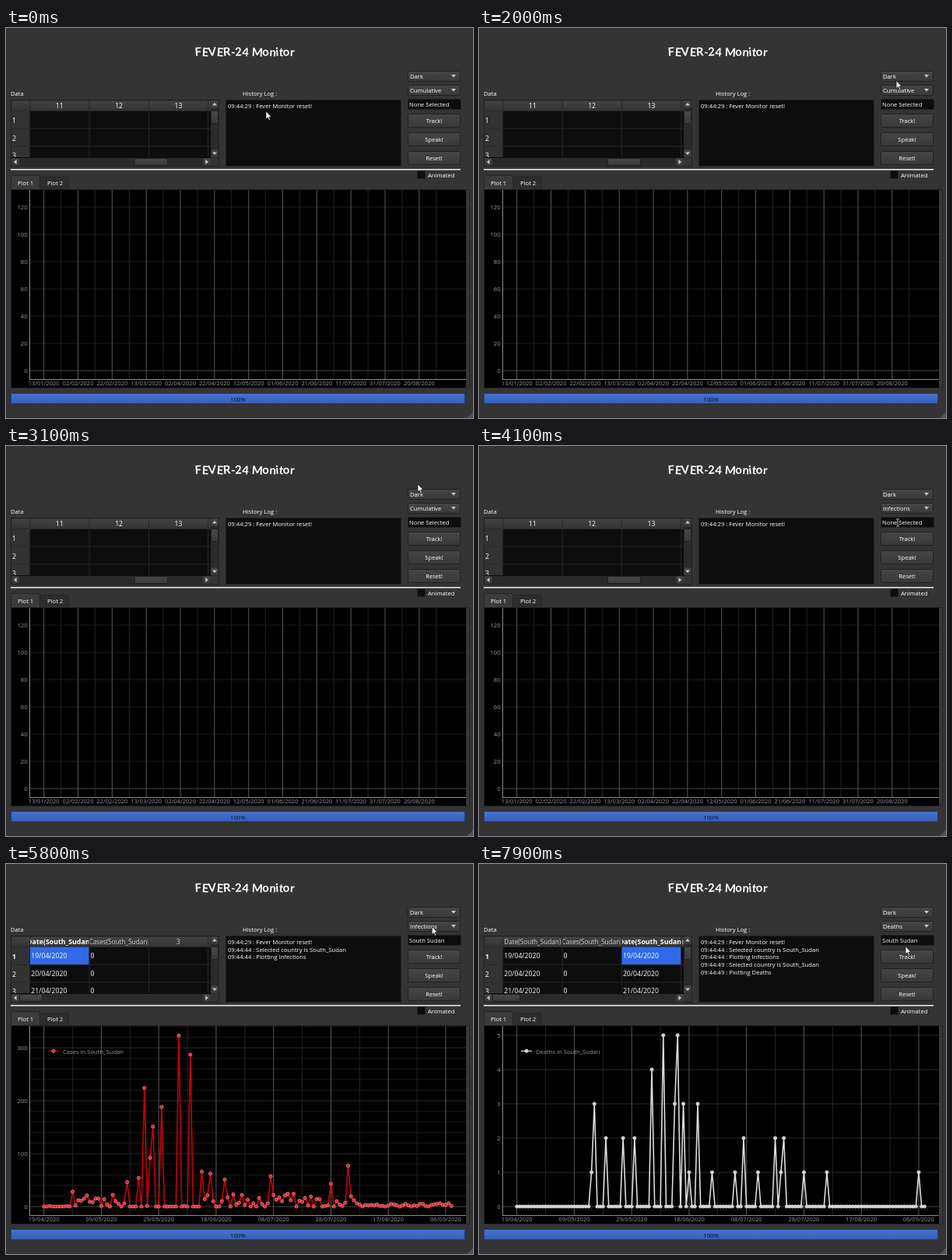
Recreate the animation shown at these times as an HTML page with a canvas. Size 600x501 px, loop 8000 ms.

```html
<!DOCTYPE html>
<html lang="en">
<head>
<meta charset="utf-8">
<title>Fever Monitor</title>
<style>
html, body { margin: 0; width: 100%; height: 100%; overflow: hidden; background: #353435; }
canvas { display: block; }
</style>
</head>
<body>
<canvas id="stage"></canvas>
<script>
const W = 600, H = 501, LOOP = 8000;
const canvas = document.getElementById('stage');
const c = canvas.getContext('2d');
const dpr = window.devicePixelRatio || 1;
canvas.width = W * dpr;
canvas.height = H * dpr;
canvas.style.width = W + 'px';
canvas.style.height = H + 'px';

const DARK = {
  bg: '#353435', ink: '#fff', field: '#0e0d0e', line: '#222', cellLine: '#292829',
  headTop: '#444344', headEnd: '#343334', btnTop: '#474647', btnEnd: '#3a393a', btnLine: '#222122',
  track: '#2b2a2b', thumb: '#4a494a', arrow: '#c8c8c8', rule: '#e4e4e4',
  tabOn: '#3c3b3c', tabOff: '#2e2d2e', frame: '#252425', gutter: '#393839',
  barTop: '#4774d1', barEnd: '#355db8', barLine: '#203b77'
};
const LIGHT = {
  bg: '#fdfdfd', ink: '#000', field: '#fff', line: '#c0c0c0', cellLine: '#d4d4d4',
  headTop: '#fbfbfb', headEnd: '#ececec', btnTop: '#fdfdfd', btnEnd: '#efefef', btnLine: '#bcbcbc',
  track: '#e6e6e6', thumb: '#f8f8f8', arrow: '#555', rule: '#a0a0a0',
  tabOn: '#fcfcfc', tabOff: '#e6e6e6', frame: '#c4c4c4', gutter: '#fdfdfd',
  barTop: '#78a2fa', barEnd: '#5a87ec', barLine: '#4068b8'
};

// daily counts: the tall spikes by day, the rest by rule
const DAYS = 143;
const CASE_SPIKES = {
  10: 28, 29: 46, 33: 54, 35: 224, 37: 92, 38: 151, 41: 188, 47: 323,
  51: 287, 55: 66, 58: 62, 63: 51, 79: 57, 100: 43, 106: 77
};
const DEATH_SPIKES = {
  26: 1, 27: 3, 31: 2, 37: 2, 41: 2, 47: 4, 51: 5, 55: 3, 56: 5, 58: 3,
  63: 3, 79: 2, 90: 2, 93: 2, 140: 1
};
const noise = i => Math.abs(Math.sin(i * 127.1) * 43758.5) % 1;
function backgroundCases(i) {
  const quiet = i < 10 || (i > 29 && i < 55);
  const height = quiet ? 1 : i < 110 ? 30 : 8;
  return Math.round(Math.max(0, noise(i) - .2) * height);
}
const series = (spikes, rest) => Array.from({ length: DAYS }, (_, i) => spikes[i] ?? rest(i));
const cases = series(CASE_SPIKES, backgroundCases);
const deaths = series(DEATH_SPIKES, i => i >= 60 && i < 110 && i % 8 === 4 ? 1 : 0);

// a tick every 20 days
const ticks = (month, day, count) => Array.from({ length: count }, (_, k) =>
  new Date(2020, month - 1, day + 20 * k).toLocaleDateString('en-GB'));
const early = ticks(1, 13, 12), late = ticks(4, 19, 8);
const PLOTS = [
  { dates: early, dx: 43.83, unit: 35, step: 20, max: 120, minor: 0 },
  { dates: late, dx: 73.75, unit: 68, step: 100, max: 300, minor: 5,
    data: cases, name: 'Cases', line: '#c60008', fill: '#e22030', edge: '#ff9a9e' },
  { dates: late, dx: 73.75, unit: 44, step: 1, max: 5, minor: 0,
    data: deaths, name: 'Deaths', line: '#dcdcdc', fill: '#d0d0d0', edge: '#eee' }
];

// time, x, y of the pointer
const PATH = [
  [0, 334, 107], [1100, 507, 70], [1800, 540, 63], [2300, 529, 76], [3100, 529, 49],
  [3700, 545, 80], [4100, 538, 98], [4500, 530, 117], [4800, 530, 117], [5700, 548, 80],
  [6700, 522, 99], [6900, 522, 99], [7400, 548, 117], [8000, 548, 105]
];
const LOG = ['09:44:29 : Fever Monitor reset!'];
for (const [time, what] of [['09:44:44', 'Infections'], ['09:44:49', 'Deaths']])
  LOG.push(`${time} : Selected country is South_Sudan`, `${time} : Plotting ${what}`);

let skin = DARK;

function text(s, x, y, { size = 7.65, align = 'left', color = skin.ink, weight = 400 } = {}) {
  c.font = `${weight} ${size}px "Open Sans", "Noto Sans", sans-serif`;
  c.textAlign = align;
  c.fillStyle = color;
  c.fillText(s, x, y);
}
function rect(x, y, w, h, fill) {
  c.fillStyle = fill;
  c.fillRect(x, y, w, h);
}
function box(x, y, w, h, top, end, edge, r = 1) {
  const g = c.createLinearGradient(0, y, 0, y + h);
  g.addColorStop(0, top);
  g.addColorStop(1, end);
  c.beginPath();
  c.roundRect(x + .5, y + .5, w - 1, h - 1, r);
  c.fillStyle = g;
  c.fill();
  c.strokeStyle = edge;
  c.lineWidth = 1;
  c.stroke();
}
function button(x, y, w, h, edge = skin.btnLine, r = 1) {
  box(x, y, w, h, skin.btnTop, skin.btnEnd, edge, r);
}
function fieldBox(x, y, w, h) {
  box(x, y, w, h, skin.field, skin.field, skin.line);
}
function clipped(x, y, w, h, draw) {
  c.save();
  c.beginPath();
  c.rect(x, y, w, h);
  c.clip();
  draw();
  c.restore();
}
function triangle(x, y, angle) {
  c.save();
  c.translate(x, y);
  c.rotate(angle);
  c.fillStyle = skin.arrow;
  c.fill(new Path2D('M-3-1.6H3L0 2Z'));
  c.restore();
}

function drawTitle() {
  const title = 'FEVER-24 Monitor';
  c.font = '700 15px Lato, "Open Sans", sans-serif';
  c.textAlign = 'left';
  c.fillStyle = skin.ink;
  let x = 306.5 - c.measureText(title).width / 2;
  [...title].forEach((ch, i) => {
    c.save();
    c.translate(x, 36);
    c.rotate(i % 2 ? .07 : -.07);
    c.fillText(ch, 0, 0);
    c.restore();
    x += c.measureText(ch).width;
  });
}

function drawScrollbars(left, width) {
  rect(263, 93, 10, 74, skin.track);
  rect(7, 167, 256, 10, skin.track);
  for (const [x, y, angle] of [[263, 93, 2], [263, 156, 0], [7, 167, 1], [253, 167, -1]]) {
    button(x, y, 10, 10, skin.btnEnd);
    triangle(x + 5, y + 5, angle * Math.PI / 2);
  }
  box(263, 106, 10, 17, skin.thumb, skin.btnEnd, skin.btnLine);
  box(left, 167, width, 10, skin.thumb, skin.btnEnd, skin.btnLine);
  rect(263, 167, 10, 10, skin.bg);
}

function drawTable(stage) {
  const date = 'Date(South_Sudan)', count = 'Cases(South_Sudan)';
  const heads = [['11', '12', '13'], [date, count, '3'], [date, count, date, 'e']][stage];
  const filled = [0, 2, 3][stage], picked = [-1, 0, 2][stage];
  rect(6, 92, 268, 86, skin.line);
  rect(7, 93, 256, 74, skin.field);
  clipped(7, 93, 256, 73, () => {
    box(7, 93, 256, 14, skin.headTop, skin.headEnd, skin.headEnd, 0);
    rect(7, 107, 23, 60, skin.headEnd);
    for (let r = 0; r < 3; r++) {
      const y = 106.5 + r * 22.7;
      rect(7, y - .5, 256, 1, skin.cellLine);
      text(r + 1, 8, y + 15.3, { size: 8.7, weight: stage && !r ? 700 : 400 });
    }
    for (let i = 0; i < 4; i++) {
      const x = 30.3 + i * 76.3, bold = i === picked;
      rect(x, 93, 1, 74, skin.cellLine);
      if (bold) rect(x + .7, 106.7, 75.6, 22.3, '#306aea');
      clipped(x + 1, 93, 75, 73, () => {
        text(heads[i] ?? '', i === 3 ? x + 3 : x + 38.5, 103.3, {
          size: bold ? 8.8 : stage ? 8.2 : 8.7, align: 'center', weight: bold ? 700 : 400,
          color: stage && !bold ? '#d0d0d0' : skin.ink
        });
        for (let r = 0; r < 3 && i < filled; r++)
          text(i % 2 ? '0' : `${19 + r}/04/2020`, x + 2, 121 + r * 22.7, { size: 8.7 });
      });
    }
  });
  drawScrollbars(stage ? 17 : 165, [43, 30, 36][stage]);
}

function combo(label, y) {
  button(516, y, 68, 14, skin.btnLine, 2);
  text(label, 519, y + 9.8);
  triangle(575, y + 6.7, 0);
}

function drawControls(mode, country) {
  combo(skin === DARK ? 'Dark' : 'Light', 55);
  combo(mode, 73);
  fieldBox(516, 91, 69, 14);
  text(country, 518, 101.2);
  ['Track!', 'Speak!', 'Reset!'].forEach((label, i) => {
    button(516, 110 + 24 * i, 68, 18, skin.btnLine, 2);
    text(label, 550, 122.2 + 24 * i, { align: 'center' });
  });
  rect(6, 181, 578, skin === DARK ? 1.6 : 1, skin.rule);
  fieldBox(528, 183, 11, 11);
  text('Animated', 542, 191.7);
}

function drawTabs() {
  box(43, 191, 38, 17, skin.tabOff, skin.tabOff, skin.frame, 2);
  box(6, 189, 38, 20, skin.tabOn, skin.tabOn, skin.frame, 2);
  text('Plot 1', 15, 201.7);
  text('Plot 2', 53, 201.7);
}

function drawGrid({ dates, dx, unit, step, max, minor, data }) {
  const color = '#9a9a9a';
  clipped(30, 208, 561, 244, () => {
    for (let k = 0; k <= max / step + 1; k++) {
      const y = 439.6 - k * unit;
      rect(30, y, 561, 1, k ? (data ? '#2c2c2c' : '#1d1d1d') : '#484848');
      for (let m = 1; m < minor; m++) rect(30, y - m * unit / minor, 561, 1, '#1a1a1a');
    }
    dates.forEach((_, k) => {
      rect(48.2 + k * dx, 208, 1, 243, '#585858');
      rect(48.2 + (k + .5) * dx, 208, 1, 243, '#242424');
    });
  });
  rect(30, 208, 1, 244, '#8c8c8c');
  rect(30, 451, 561, 1, '#8c8c8c');
  for (let k = 0; k <= max / step; k++)
    text(k * step, 27.5, 443 - k * unit, { align: 'right', color });
  dates.forEach((d, k) =>
    text(d, 48.7 + k * dx, 459.2, { align: 'center', color, size: 7.5 }));
}

function drawCurve({ dx, unit, step, data, name, line, fill, edge }) {
  const dot = (x, y) => {
    c.beginPath();
    c.arc(x, y, 2.1, 0, 7);
    c.fillStyle = fill;
    c.fill();
    c.lineWidth = .7;
    c.strokeStyle = edge;
    c.stroke();
  };
  const points = data.map((v, i) => [48.7 + i * dx / 20, 440 - v * unit / step]);
  c.beginPath();
  points.forEach(p => c.lineTo(...p));
  c.strokeStyle = line;
  c.lineWidth = 1.6;
  c.lineJoin = 'round';
  c.stroke();
  points.forEach(p => dot(...p));
  rect(54, 239.7, 14, 1.2, line);
  dot(61, 240.2);
  text(`${name} in South_Sudan`, 73, 243.5, { color: '#9a9a9a' });
}

function drawPlot(plot) {
  drawTabs();
  box(6, 207, 590, 256, skin.gutter, skin.gutter, skin.frame, 0);
  rect(7, 208, 584, 254, '#000');
  drawGrid(plot);
  if (plot.data) drawCurve(plot);
}

function drawPointer(t) {
  const n = PATH.findIndex(p => p[0] > t);
  const [a, b] = [PATH[n - 1], PATH[n]];
  const u = (t - a[0]) / (b[0] - a[0]), e = u * u * (3 - 2 * u);
  const x = a[1] + (b[1] - a[1]) * e, y = a[2] + (b[2] - a[2]) * e;
  const overField = x > 517 && x < 583 && y > 92 && y < 104;
  c.save();
  c.translate(x, y);
  if (overField) {
    c.strokeStyle = '#aaa';
    c.lineWidth = 1;
    c.stroke(new Path2D('M-2-4H2M0-4V5M-2 5H2'));
  } else {
    const arrow = new Path2D('M0 0V10L2.3 7.9 4 11.6 5.5 11 3.9 7.3H7Z');
    c.fillStyle = '#fff';
    c.strokeStyle = '#111';
    c.lineWidth = .7;
    c.fill(arrow);
    c.stroke(arrow);
  }
  c.restore();
}

function draw(t) {
  skin = t >= 2050 && t < 2950 ? LIGHT : DARK;
  const stage = t < 4500 ? 0 : t < 7450 ? 1 : 2;
  const mode = t < 3850 ? 'Cumulative' : t < 6250 ? 'Infections' : 'Deaths';
  c.setTransform(dpr, 0, 0, dpr, 0, 0);
  rect(0, 0, W, H, skin.bg);
  drawTitle();
  text('Data', 6, 87.2);
  text('History Log :', 304, 87.2);
  drawTable(stage);
  fieldBox(282, 92, 226, 86);
  LOG.slice(0, 1 + 2 * stage).forEach((s, i) => text(s, 285, 103 + i * 9.7));
  drawControls(mode, t < 4150 ? 'None Selected' : 'South Sudan');
  drawPlot(PLOTS[stage]);
  box(6, 469, 584, 14, skin.barTop, skin.barEnd, skin.barLine);
  text('100%', 298, 479.7, { align: 'center', color: '#0a1024' });
  c.fillStyle = 'rgba(150, 150, 150, .3)';
  c.fill(new Path2D('M600 493V501H592Z'));
  drawPointer(t);
}

const start = performance.now();
function tick() {
  draw((performance.now() - start) % LOOP);
  requestAnimationFrame(tick);
}
tick();
</script>
</body>
</html>
```
